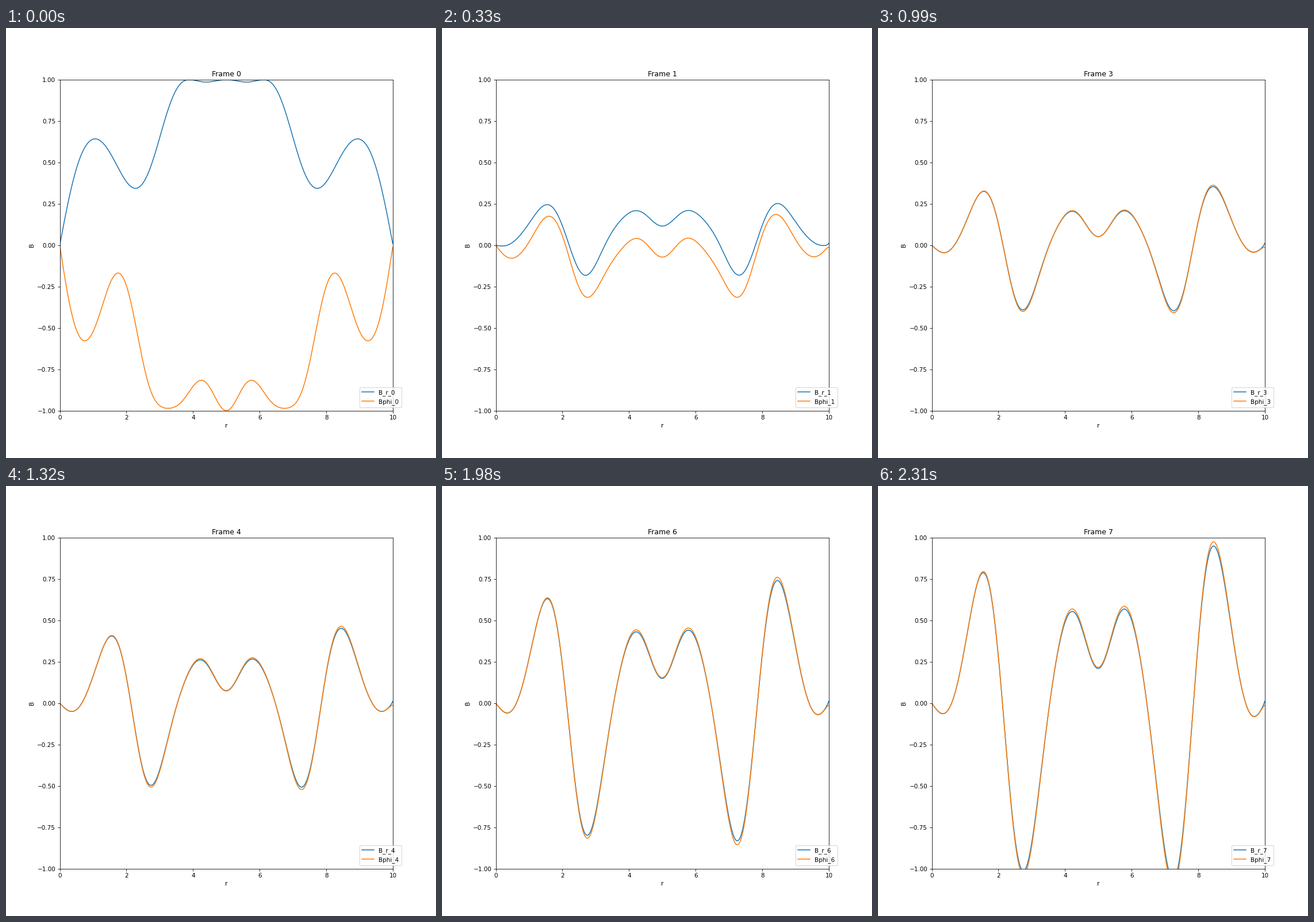
Animation of 748 by 748 pixels, one loop 2640 ms. Source, as a matplotlib script:

```python
import numpy as np
import matplotlib.pyplot as plt
from matplotlib.animation import FuncAnimation

FRAMES = 8
STEPS = 100          # RK4 steps per frame
DR = 0.01

DECAY = 1.043        # vertical diffusion
ETA = 0.0042         # radial diffusion
ALPHA = 1.280        # coupling of B_phi into B_r

r = np.arange(0, 10, DR)
inner = r[1:-1]
pitch = 1.031 - 0.067 * np.exp(-inner / 1.4) - 0.012 * (inner / 10) ** 6
shear = ALPHA * pitch ** 2


def seed(waves):
    u = np.pi * r / 10
    return np.sin(u + 0.4 * np.sin(waves * u))


def diffuse(b):
    d1 = (b[2:] - b[:-2]) / (2 * DR)
    d2 = (b[2:] - 2 * b[1:-1] + b[:-2]) / DR ** 2
    return ETA * (d2 + d1 / inner - b[1:-1] / inner ** 2)


def rate(field):
    br, bphi = field
    out = np.zeros_like(field)   # both ends stay fixed
    out[0, 1:-1] = ALPHA * bphi[1:-1] - DECAY * br[1:-1] + diffuse(br)
    out[1, 1:-1] = shear * br[1:-1] - DECAY * bphi[1:-1] + diffuse(bphi)
    return out


def advance(field):
    h = 1 / STEPS
    for _ in range(STEPS):
        k1 = rate(field)
        k2 = rate(field + h / 2 * k1)
        k3 = rate(field + h / 2 * k2)
        k4 = rate(field + h * k3)
        field = field + h / 6 * (k1 + 2 * k2 + 2 * k3 + k4)
    return field


history = [np.array([seed(6), -seed(8)])]
while len(history) < FRAMES:
    history.append(advance(history[-1]))

fig, ax = plt.subplots(figsize=(10, 10), dpi=74.8)


def draw(n):
    ax.clear()
    br, bphi = history[n]
    ax.plot(r, br, label=f"B_r_{n}")
    ax.plot(r, bphi, label=f"Bphi_{n}")
    ax.set(xlim=(0, 10), ylim=(-1, 1), xlabel="r", ylabel="B",
           title=f"Frame {n}")
    ax.legend(loc=(0.9, 0.01))


anim = FuncAnimation(fig, draw, frames=FRAMES, init_func=lambda: None,
                     interval=330, repeat=True, repeat_delay=0)
plt.show()
```
